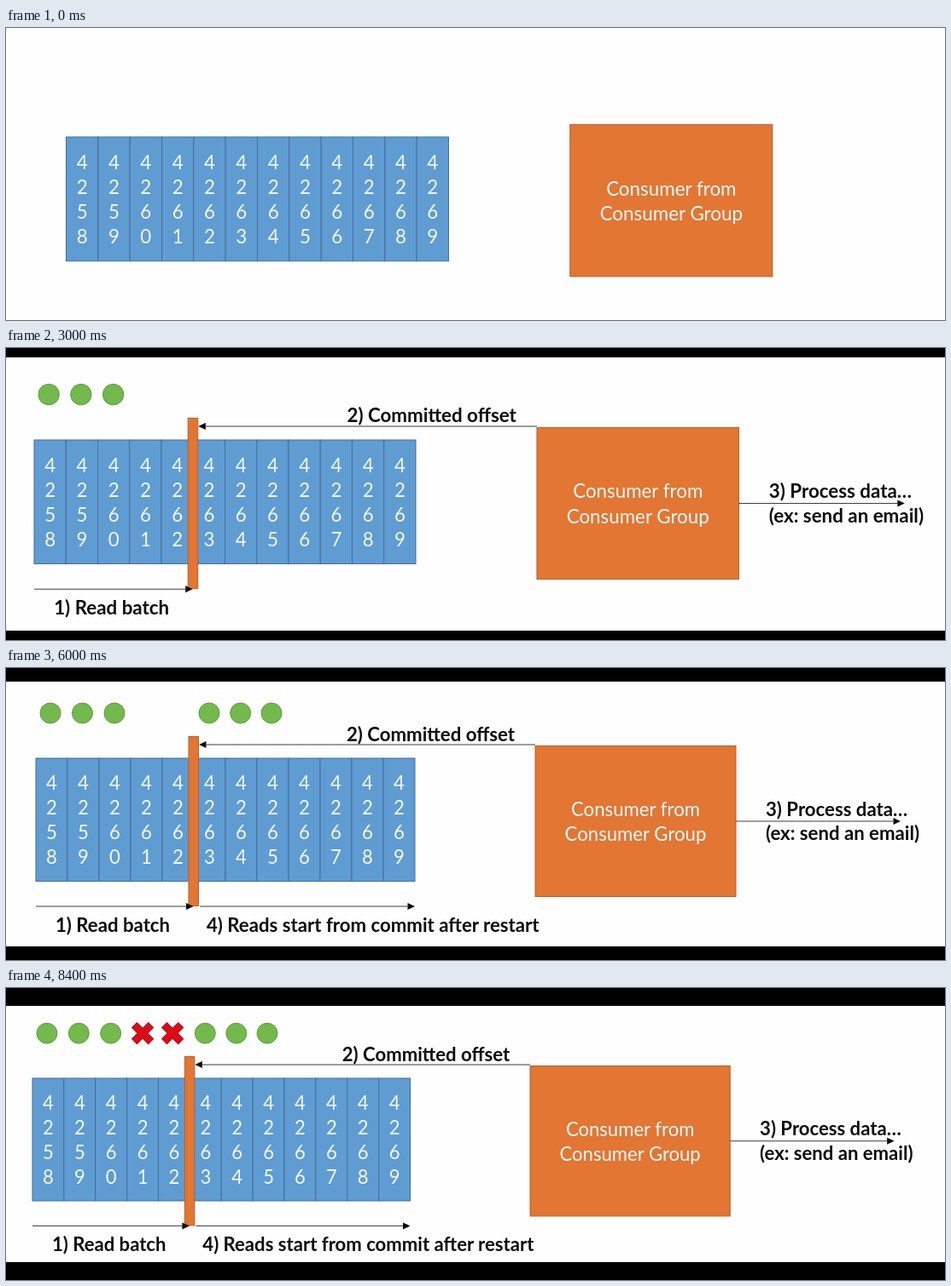
Recreate the animation shown at these times as an HTML page. Size 1100 by 343 pixels, loop 9 s.

```html
<!DOCTYPE html>
<html lang="en">
<head>
<meta charset="utf-8">
<title>Consumer offsets</title>
<style>
html, body { margin: 0; width: 100%; height: 100%; overflow: hidden; background: #fefefe; }
svg { display: block; width: 1100px; height: 343px; }
text { font: 22.2px Lato, Carlito, sans-serif; fill: #f6f9fc; text-anchor: middle; }
text.label { font-weight: bold; fill: #0c0c0c; text-anchor: start; }
.cell { fill: #5f9cd2; stroke: #456f99; }
.orange { fill: #e27632; stroke: #b4612c; }
.line { stroke: #3c3c3c; }
.head { fill: #0c0c0c; }
.dot { fill: #73b94b; stroke: #5d9c3c; }
.cross { fill: #dc0b16; stroke: #b00d16; }
.stop { fill: #e60302; stroke: #b50a0a; fill-rule: evenodd; }
.side { fill: #cb7039; }
</style>
</head>
<body>
<svg viewBox="0 0 1100 343">
  <rect width="1100" height="343" fill="#fefefe"/>
  <g id="scene"></g>
  <g id="sides"><rect class="side" width="9" height="343"/><rect class="side" x="1091" width="9" height="343"/></g>
  <rect id="top" width="1100"/>
  <rect id="bottom" width="1100"/>
</svg>
<script>
const $ = id => document.getElementById(id);
const STEP = 600, CELL = 37;

// Each slide: diagram x, y, width, black bar height
const slides = [
  [70.5, 128, 448, 0],
  [53.5, 92.5, 491, 0],
  [38, 104, 443, 13],
  [40.5, 100.5, 438.5, 20],
  [36, 104, 443, 18],
  [33, 108, 447, 11],
  [33, 108, 447, 14],
  [35, 105, 444, 22],
  [36, 106, 444.5, 20],
  [35, 107, 445, 14],
  [35, 106, 444, 16],
  [36, 104.5, 444, 21],
  [34, 107, 444, 14],
  [32, 108, 443, 12],
  [31, 106, 442.5, 21]
];

const parts = [];

function add(html, from = 0, to = slides.length) {
  const g = document.createElementNS("http://www.w3.org/2000/svg", "g");
  g.innerHTML = html;
  $("scene").append(g);
  parts.push({ g, from, to });
}

const rect = (cls, x, y, w, h) =>
  `<rect class="${cls}" x="${x}" y="${y}" width="${w}" height="${h}"/>`;
const text = (s, x, y, cls = "") => `<text class="${cls}" x="${x}" y="${y}">${s}</text>`;
const label = (s, x, y) => text(s, x, y, "label");

function arrow(x1, x2, y) {
  const back = x2 - Math.sign(x2 - x1) * 8.5;
  return `<path class="line" d="M${x1} ${y}H${back}"/>
    <path class="head" d="M${x2} ${y}L${back} ${y - 4}V${y + 4}Z"/>`;
}

const dot = x => `<circle class="dot" cx="${x}" cy="-53" r="12"/>`;

function cross(x) {
  const a = 4.2, b = 13.6;
  return `<path class="cross" transform="translate(${x} -53) rotate(45)"
    d="M${-a} ${-b}H${a}V${-a}H${b}V${a}H${a}V${b}H${-a}V${a}H${-b}V${-a}H${-a}Z"/>`;
}

// Ring with a diagonal band, built from two circle segments cut out of a disc
function stop(x, y) {
  const R = 114, r = 70.5, h = 21.5, c = Math.sqrt(r * r - h * h);
  return `<path class="stop" transform="translate(${x} ${y}) rotate(45)"
    d="M${-R} 0A${R} ${R} 0 0 1 ${R} 0A${R} ${R} 0 0 1 ${-R} 0Z
       M${-c} ${-h}A${r} ${r} 0 0 1 ${c} ${-h}Z
       M${-c} ${h}A${r} ${r} 0 0 0 ${c} ${h}Z"/>`;
}

let cells = "";
for (let i = 0; i < 12; i++) {
  cells += rect("cell", i * CELL, 0, CELL, 144.5);
  [...String(4258 + i)].forEach((d, j) => cells += text(d, (i + .5) * CELL, 37.3 + j * 28.9));
}
add(cells);
add(rect("orange", 585, -14.5, 235, 177) +
  text("Consumer from", 702.5, 68) + text("Consumer Group", 702.5, 97));
add(rect("orange", 179, -25.5, 11.5, 199), 2);
add(arrow(0, 184.5, 174) + label("1) Read batch", 23, 203.5), 1);
add(arrow(585, 191, -16) + label("2) Committed offset", 364, -20.5), 2);
add(arrow(820, 1013, 74) + label("3) Process data…", 855, 67.5) +
  label("(ex: send an email)", 855, 96), 3);
add(dot(17), 4);
add(dot(54.5) + dot(92), 5);
add(stop(702.3, 68.5), 6, 7);
add(arrow(192, 444, 174) + label("4) Reads start from commit after restart", 200, 203.5), 8);
add(dot(203), 9);
add(dot(239.7) + dot(276), 10);
add(cross(129.5), 11);
add(cross(164.7), 12);

let shown = -1;

function draw(n) {
  const [x, y, w, bar] = slides[n];
  $("scene").setAttribute("transform", `translate(${x} ${y}) scale(${w / 444})`);
  for (const { g, from, to } of parts) g.style.display = n >= from && n < to ? "" : "none";
  $("sides").style.display = n === 1 ? "" : "none";
  $("top").setAttribute("height", bar);
  $("bottom").setAttribute("y", 343 - bar);
  $("bottom").setAttribute("height", bar);
}

function tick() {
  const n = Math.floor(performance.now() / STEP) % slides.length;
  if (n !== shown) draw(shown = n);
  requestAnimationFrame(tick);
}
tick();
</script>
</body>
</html>
```
